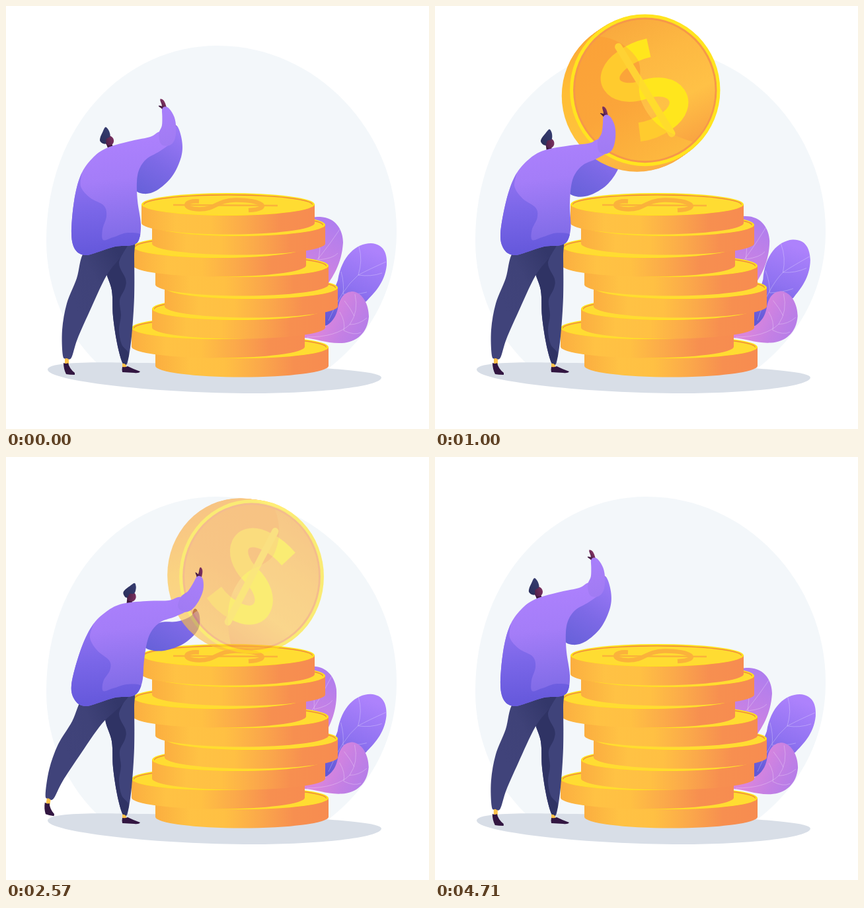
An HTML page with a canvas for the animation above (4.78 s loop, 640 by 640 pixels).

```html
<!DOCTYPE html>
<html lang="en">
<head>
<meta charset="utf-8">
<title>Coin stack</title>
<style>
html, body { margin: 0; height: 100%; overflow: hidden; background: #fff; }
canvas { display: block; width: 640px; height: 640px; }
</style>
</head>
<body>
<canvas id="stage" width="640" height="640"></canvas>
<script>
const LOOP = 4780, TAU = Math.PI * 2, RAD = Math.PI / 180;
const g = document.getElementById('stage').getContext('2d');
const coinLayer = document.createElement('canvas');
coinLayer.width = coinLayer.height = 640;
const cg = coinLayer.getContext('2d');

const clamp = v => Math.min(1, Math.max(0, v));
const points = text => text.split(' ').map(p => p.split(',').map(Number));
// Falls from 1 to 0 along half a cosine wave
const fall = u => (1 + Math.cos(Math.PI * clamp(u))) / 2;
const sway = turns => Math.sin(TAU * turns);

// Closed smooth curve through points
function blob(list) {
  const path = new Path2D(), n = list.length, at = i => list[(i + n) % n];
  path.moveTo(...at(0));
  for (let i = 0; i < n; i++) {
    const [a, b, c, d] = [at(i - 1), at(i), at(i + 1), at(i + 2)];
    path.bezierCurveTo(b[0] + (c[0] - a[0]) / 6, b[1] + (c[1] - a[1]) / 6,
      c[0] - (d[0] - b[0]) / 6, c[1] - (d[1] - b[1]) / 6, c[0], c[1]);
  }
  path.closePath();
  return path;
}

function gradient(x0, y0, x1, y1, ...colors) {
  const grad = g.createLinearGradient(x0, y0, x1, y1);
  colors.forEach((c, i) => grad.addColorStop(i / (colors.length - 1), c));
  return grad;
}

function fill(c, path, style) { c.fillStyle = style; c.fill(path); }

function line(c, path, style, width, cap = 'butt') {
  c.strokeStyle = style; c.lineWidth = width; c.lineCap = cap; c.stroke(path);
}

function disc(c, x, y, rx, ry, style) {
  c.beginPath(); c.ellipse(x, y, rx, ry, 0, 0, TAU);
  c.fillStyle = style; c.fill();
}

function placed(x, y, angle, draw) {
  g.save(); g.translate(x, y); g.rotate(angle); draw(); g.restore();
}

function clipped(path, draw) {
  g.save(); g.clip(path); draw(); g.restore();
}

// Scenery
const backdrop = new Path2D('M61 355C61 180 180 60 320 60C470 60 591 190 591 340C591 430 550 500 488 548L146 548C92 500 61 430 61 355Z');
const ground = new Path2D('M63 550C64 537 150 539 200 540C350 541 569 547 568 562C567 577 460 587 360 586C220 585 63 567 63 550Z');

const leaves = [
  { base: [450, 440], turn: u => -.12 * sway(u / 2) ** 2,
    shape: new Path2D('M450 335C455 318 470 319 475 319C500 320 510 340 510 358C508 390 495 410 480 430L450 430Z'),
    veins: new Path2D('M452 405Q475 382 505 338M473 384Q478 355 470 330M473 384Q495 382 502 374'),
    color: gradient(455, 410, 500, 325, '#d184e0', '#ae7def') },
  { base: [487, 475], turn: u => -.1 * sway(u) ** 2,
    shape: new Path2D('M482 484C478 455 492 442 502 415C508 378 530 359 552 359C572 360 577 375 576 392C573 420 556 435 545 447C525 455 520 480 482 484Z'),
    veins: new Path2D('M488 476Q508 428 533 407Q550 398 575 387M533 407Q540 385 534 364M510 436Q512 420 507 402M533 407Q552 410 569 404M510 436Q530 437 546 433'),
    color: gradient(545, 365, 495, 480, '#ad82fc', '#8f72f1', '#6259d6') },
  { base: [460, 500], turn: u => -.018 * sway(2 * u),
    shape: new Path2D('M450 494C482 490 497 480 502 458C505 440 513 432 525 432C540 434 549 452 549 470C547 495 530 509 508 510C485 511 470 503 450 502Z'),
    veins: new Path2D('M455 501Q500 501 520 482Q534 462 528 436M511 491Q514 478 505 463M527 469Q521 457 512 446M520 482Q534 482 546 472M511 491Q527 499 537 494'),
    color: gradient(490, 460, 548, 490, '#d985dd', '#c480e4', '#b47de9') }
];

function drawLeaf({ base: [x, y], turn, shape, veins, color }, t) {
  placed(x, y, turn(t / LOOP), () => {
    g.translate(-x, -y);
    fill(g, shape, color);
    line(g, veins, 'rgba(255,255,255,.3)', .9);
  });
}

// Left edge and height of each coin's top face, bottom to top
const stack = points('226,516 190,487 221,458 240,426 226,393 192,364 221,331 205,300');
const flatSign = new Path2D('M292 295.5C268 294 266 307 292 307.5C318 308 318 294 347 293.5C388 293 404 307 367 309');
const flatBar = new Path2D('M253 301L411 302');

function drawStack() {
  const rx = 131, ry = 17;
  for (const [left, y] of stack) {
    const x = left + rx, right = x + rx;
    g.beginPath();
    g.ellipse(x, y + 28.5, rx, ry, 0, 0, Math.PI);
    g.lineTo(left, y); g.lineTo(right, y);
    g.fillStyle = gradient(left, 0, right, 0, '#fbae40', '#ffc244', '#ffc043', '#fba94a', '#f78f50', '#f78c50');
    g.fill();
    disc(g, x, y, rx, ry, '#ffe41d');
    disc(g, x, y, rx - 3, ry - 2, '#f08b3c');
    disc(g, x, y + 1.3, rx - 3.5, ry - 2.3, '#ffdc32');
  }
  line(g, flatSign, '#fbb23b', 6.5);
  line(g, flatBar, '#fbb23b', 2.4);
}

// Rolling coin
const sign = new Path2D('M39 -52C22 -58 10 -59 -3 -58C-52 -56 -50 -14 -3 -2C50 10 50 56 3 58C-12 59 -28 56 -41 50');
const bar = new Path2D('M0 -78L0 78');
const brightSide = new Path2D('M-18 -108C0 -95 15 -72 15 -44C10 -20 -8 -16 -14 12C-20 50 -4 78 21 106L130 106L130 -120L-18 -120Z');

function paintFace(background, signColor, barColor) {
  cg.fillStyle = background;
  cg.fillRect(-130, -130, 260, 260);
  line(cg, sign, signColor, 29);
  line(cg, bar, barColor, 11, 'round');
}

function drawCoin(t) {
  const fade = 540, alpha = clamp(Math.min(t, 2900 - t) / fade);
  if (!alpha) return;
  const roll = (t - 570) / 2000, settle = Math.exp(-t / 1000);
  const x = 303 + 68.5 * roll;
  const y = 181 - .117 * Math.max(0, 1460 - t);
  const angle = (-52 + 97 * roll - 16 * roll * roll) * RAD;
  // The thicker the visible side, the narrower the face
  const dx = -19.5 * (1 - settle), dy = 37 * settle - 5;
  const rx = 117.5 - dx * dx / 40, ry = 116.5 - dy * dy / 46;

  cg.clearRect(0, 0, 640, 640);
  const edge = gradient(x - 100, y - 100, x, y + 130, '#fba238', '#ffbd35', '#ffc33d', '#fbad45');
  for (let k = 1; k > 0; k -= 1 / 16) disc(cg, x + dx * k, y + dy * k, rx, ry, edge);
  disc(cg, x, y, rx, ry, '#ffe41f');
  disc(cg, x, y, rx - 5, ry - 5, '#f6974a');
  cg.save();
  cg.beginPath();
  cg.ellipse(x, y, rx - 8, ry - 8, 0, 0, TAU);
  cg.clip();
  cg.translate(x, y);
  cg.scale(rx / 116, ry / 116);
  cg.rotate(angle);
  paintFace(gradient(0, -110, 0, 110, '#fba238', '#fba53a', '#fdb93f'), '#ffcb2e', '#ffd234');
  cg.clip(brightSide);
  paintFace(gradient(30, -110, 10, 110, '#f9a93e', '#fdb842', '#ffc146', '#f9a241'), '#ffe61d', '#ffdc2c');
  cg.restore();

  g.globalAlpha = alpha;
  g.drawImage(coinLayer, 0, 0);
  g.globalAlpha = 1;
}

// Person, outlined in the upright pose
const torso = points('99,345 103,295 113,256 130,231 152,215 190,204 218,198 233,190 252,192 250,206 232,220 ' +
  '213,231 202,246 198,265 199,295 204,330 201,354 190,362 165,364 140,372 120,377 105,369');
const fold = points('113,250 113,273 127,290 148,302 152,318 146,338 147,354 162,350 185,343 208,350 205,390 90,390 85,300');
const farArm = points('258,181 266,203 265,228 251,258 228,279 208,284 195,275 198,240 210,220 232,212 248,198');
const backLeg = blob(points('118,372 107,412 92,450 85,490 86,529 92,533 99,532 108,504 126,463 152,408 176,376 186,350 150,345'));
const frontLeg = blob(points('150,392 160,430 162,470 168,510 175,537 179,541 184,539 190,500 194,440 194,380 193,350 165,350'));
const legShade = blob(points('181,360 171,389 181,413 180,427 172,445 174,468 171,490 175,512 186,528 170,550 145,480 140,380'));
const forearm = blob(points('-14,-10 -8,-22 -6,-36 -5,-47 0,-50 6,-46 12,-33 13,-16 9,1 0,9 -12,6'));
const hair = blob(points('-12,-4 -10,-9 -4,-15 3,-21 6,-16 6,-9 4,-5 -2,-4 -5,2 -9,1'));
const hand = new Path2D('M-3 2C-3 -1 -6 -3 -7 -6C-5 -6 -3 -4 -2 -4C-1 -8 -3 -13 -1 -15C3 -14 4 -9 4 -5L4 2Z');
const backShoe = new Path2D('M87 540Q91 542 94 540Q96 549 104 555V558Q96 558 91 557Q87 549 87 540Z');
const frontShoe = new Path2D('M176 546Q181 547 184 545Q192 549 203 553Q201 556 194 555L176 554Q175 550 176 546Z');
const skin = '#fdc24b', shoe = '#321641';

// Leaning shifts the body forward with height above the hem and dips it towards the arms
function leaned([x, y], lean, sag = 0) {
  const rise = Math.max(0, 345 - y);
  const dip = .19 * (x - 115) * clamp(rise / 40) + sag * (258 - y);
  return [x + .2 * rise * lean, y + dip * lean];
}

function drawFarArm(lean) {
  const bend = p => leaned(p, lean, .35);
  disc(g, ...bend([256, 188]), 4, 8, '#6b2b50');
  fill(g, blob(farArm.map(bend)), gradient(270, 195, 215, 295, '#9a78f6', '#7d69e6', '#6560d8'));
}

function drawFoot(x, y, path) {
  g.fillStyle = skin;
  g.fillRect(x, y, 6, 11);
  fill(g, path, shoe);
}

function drawLegs(stride) {
  drawFoot(176, 537, frontShoe);
  fill(g, frontLeg, '#3f437a');
  clipped(frontLeg, () => fill(g, legShade, '#2f3364'));
  placed(175, 365, .165 * stride, () => {
    g.translate(-175, -365);
    drawFoot(89, 531, backShoe);
    fill(g, backLeg, gradient(100, 450, 185, 400, '#40437a', '#3f4278', '#33376a'));
  });
}

function drawHead(lean) {
  placed(155 + 35 * lean, 204 + 7.5 * lean, (30 * lean - 22) * RAD, () => {
    g.fillStyle = '#3b1539';
    g.fillRect(-5, 2, 8, 12);
    disc(g, 1, 0, 7, 7.5, gradient(-6, 0, 8, 0, '#4b1f47', '#7a3160'));
    fill(g, hair, gradient(-10, 0, 6, -12, '#2b2f5c', '#343a6c'));
  });
}

function drawTorso(lean) {
  const bend = p => leaned(p, lean), body = blob(torso.map(bend));
  fill(g, body, gradient(150, 212, 170, 365, '#ab80fc', '#a47df8', '#8f73ee', '#7c69e5'));
  clipped(body, () => fill(g, blob(fold.map(bend)), gradient(130, 250, 140, 370, '#9474f2', '#7a66e8', '#6659dc')));
}

function drawForearm(lean, stride) {
  const turn = 22 * lean * lean + 10 * stride - 6;
  placed(...leaned([246, 202], lean), turn * RAD, () => {
    placed(-2, -48, -12 * RAD, () => fill(g, hand, gradient(-6, 0, 4, -4, '#33153c', '#7d315f')));
    fill(g, forearm, gradient(0, -50, 0, 10, '#a87ffb', '#a57df6', '#a07bf3'));
  });
}

function draw(t) {
  const lean = 1.05 * clamp(t / 2900) ** .7 * fall((t - 3050) / 1600);
  const stride = 1.5 * fall(Math.abs(t - 3180) / 1600);
  g.fillStyle = '#fff';
  g.fillRect(0, 0, 640, 640);
  fill(g, backdrop, '#f3f7fa');
  fill(g, ground, '#d8dee7');
  leaves.forEach(leaf => drawLeaf(leaf, t));
  drawStack();
  drawFarArm(lean);
  drawCoin(t);
  drawLegs(stride);
  drawHead(lean);
  drawTorso(lean);
  drawForearm(lean, stride);
}

const start = performance.now();
function frame() {
  draw((performance.now() - start) % LOOP);
  requestAnimationFrame(frame);
}
frame();
</script>
</body>
</html>
```
